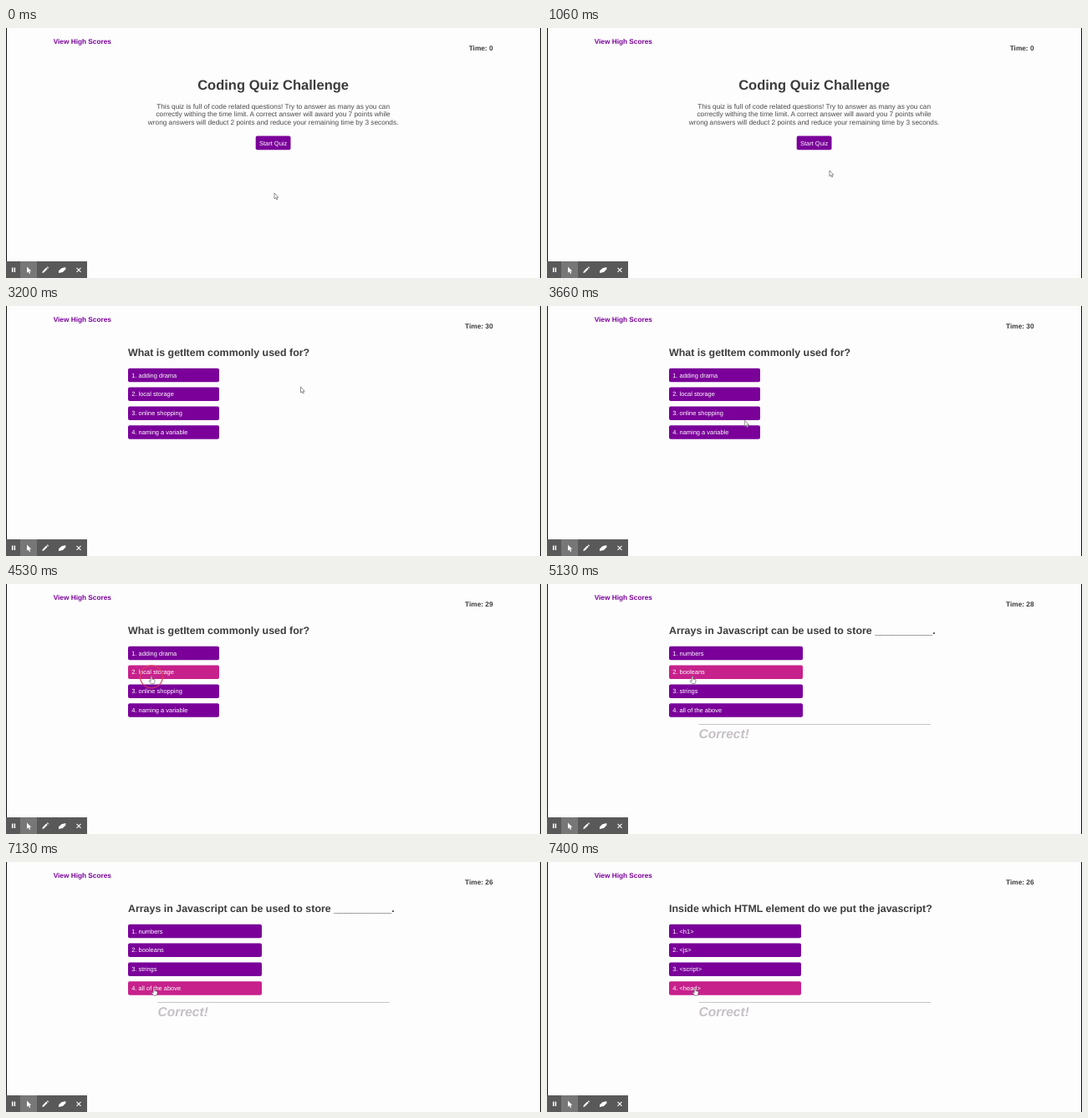
Write an HTML page that moves like this. It is 640 px wide and 300 px high and loops after 8000 ms.

```html
<!DOCTYPE html>
<html lang="en">
<head>
<meta charset="utf-8">
<title>Coding Quiz</title>
<style>
  html, body { margin: 0; width: 100%; height: 100%; overflow: hidden; background: #fdfdfd; }
  svg { display: block; width: 640px; height: 300px; }
  text { font-family: "Liberation Sans", Arial, sans-serif; font-size: 8.27px; fill: #4a4a4a; text-rendering: geometricPrecision; white-space: pre; }
  .bold { font-weight: bold; fill: #3c3c3c; }
  .mid { text-anchor: middle; }
  .btn rect { fill: #7a0099; }
  .btn.hover rect { fill: #c7218c; }
  .btn text { font-size: 7.47px; fill: #fff; }
</style>
</head>
<body>
<svg viewBox="0 0 640 300">
  <rect width="640" height="300" fill="#fdfdfd"/>
  <rect width="1" height="300" fill="#111"/>
  <rect x="639" width="1" height="300" fill="#111"/>
  <text class="bold" x="56.7" y="18.6" style="fill:#7a0099">View High Scores</text>
  <text class="bold" id="timer" x="582.5" y="26.9" text-anchor="end"></text>

  <g id="intro">
    <text class="bold mid" x="319.6" y="74.2" style="font-size:16.54px">Coding Quiz Challenge</text>
    <text class="mid" x="319.6" y="97">This quiz is full of code related questions! Try to answer as many as you can</text>
    <text class="mid" x="319.6" y="106.2">correctly withing the time limit. A correct answer will award you 7 points while</text>
    <text class="mid" x="319.6" y="115.5">wrong answers will deduct 2 points and reduce your remaining time by 3 seconds.</text>
    <g class="btn" id="start">
      <rect x="298.7" y="129.6" width="41.8" height="16.6" rx="2"/>
      <text class="mid" x="319.6" y="140.5">Start Quiz</text>
    </g>
    <rect id="focus" x="298.5" y="129.5" width="42" height="16.8" rx="1.5" fill="none" stroke="#1a1016"/>
  </g>

  <g id="quiz">
    <text class="bold" id="ask" x="146" y="59.6" style="font-size:12.42px"></text>
    <g id="options"></g>
    <g id="result">
      <path d="M181.5 168.5H459" stroke="#c9c6c9"/>
      <text class="bold" x="181.5" y="185.2" style="font-size:15.5px;font-style:italic;fill:#c6c0c6">Correct!</text>
    </g>
  </g>

  <g>
    <rect y="280" width="97" height="20" fill="#595959"/>
    <rect x="17" y="280" width="20" height="20" fill="#777"/>
    <path d="M7.7 287.5v5.4M10.4 287.5v5.4" stroke="#fff" stroke-width="1.5"/>
    <path d="M25 286.4v7.3l1.8-1.5 1.2 2.7 1.2-.6-1.2-2.5h2.3z" fill="#fff"/>
    <path d="M43.3 294l.5-2 4.4-4.4 1.5 1.5-4.4 4.4zM48.8 287l.9-.8 1.5 1.5-.8.9z" fill="#fff"/>
    <path d="M63 291.5l3.3-3.3 5-1.2v2.6l-3.4 3.4-4.9 1z" fill="#fff"/>
    <path d="M84.5 287.9l5 5M89.5 287.9l-5 5" stroke="#fff" stroke-width="1.1"/>
  </g>

  <circle id="ring" r="13.5" fill="none" stroke="#dc3f5e" stroke-width="1.3"/>
  <g id="pointer">
    <path id="arrow" d="M0 0v7l1.6-1.4 1.1 2.4 1.1-.5-1-2.3h2z" fill="#fff" stroke="#6c6c6c" stroke-width=".75"/>
    <path id="hand" d="M-.8 .6q.8-1 1.6 0v3l2.6.6q.8.3.7 1.2l-.5 2.5-.6 1.3h-3.3l-2.6-3.3q.2-.9 1.1-.4l1 .8z" fill="#fff" stroke="#55485a" stroke-width=".6"/>
  </g>
</svg>
<script>
const LOOP = 8000, STEP = 200 / 3;
const $ = id => document.getElementById(id);

const questions = [
  { at: 2200, width: 109, ask: "What is getItem commonly used for?",
    options: ["adding drama", "local storage", "online shopping", "naming a variable"] },
  { at: 4660, width: 160, ask: "Arrays in Javascript can be used to store __________.",
    options: ["numbers", "booleans", "strings", "all of the above"] },
  { at: 7330, width: 158, ask: "Inside which HTML element do we put the javascript?",
    options: ["<h1>", "<js>", "<script>", "<head>"] }
];

// time, x, y of the pointer tip
const path = [
  [0, 321, 198], [660, 351, 189], [800, 351, 189], [1066, 338, 171],
  [1600, 320, 140], [2866, 320, 140], [3200, 352.5, 97], [3766, 212, 146],
  [4266, 174, 110.5], [5866, 174, 110.5], [6000, 174.5, 117.5],
  [6266, 177, 151], [LOOP, 177, 151]
];

// start, fade, end
const clicks = [[2130, 2200, 2260], [4530, 4660, 4730], [7200, 7260, 7330]];
const ticks = [3130, 4130, 5130, 6130, 7130];

const NS = "http://www.w3.org/2000/svg";
const rows = [0, 1, 2, 3].map(i => {
  const add = (parent, tag, attrs) => {
    const el = document.createElementNS(NS, tag);
    for (const key in attrs) el.setAttribute(key, attrs[key]);
    return parent.appendChild(el);
  };
  const y = 74.7 + i * 22.87;
  const g = add($("options"), "g", { class: "btn" });
  return {
    g, y,
    box: add(g, "rect", { x: 146, y, width: 109, height: 16.5, rx: 2 }),
    label: add(g, "text", { x: 150.2, y: y + 10.9 })
  };
});

function pointerAt(t) {
  const i = path.findIndex(p => p[0] > t);
  const a = path[i - 1], b = path[i];
  const k = (t - a[0]) / (b[0] - a[0]);
  return [a[1] + (b[1] - a[1]) * k, a[2] + (b[2] - a[2]) * k];
}

const inside = (x, y, left, top, w) => x >= left && x <= left + w && y >= top && y <= top + 16.6;
const show = (el, on) => { el.style.display = on ? "" : "none"; };

function draw(t) {
  const [x, y] = pointerAt(Math.floor((t + 7) / STEP) * STEP % LOOP);
  const question = questions.filter(q => t >= q.at).pop();
  let over = false;

  show($("intro"), !question);
  show($("quiz"), question);
  if (question) {
    $("ask").textContent = question.ask;
    show($("result"), question !== questions[0]);
    rows.forEach((row, i) => {
      const hit = inside(x, y, 146, row.y, question.width);
      row.box.setAttribute("width", question.width);
      row.label.textContent = `${i + 1}. ${question.options[i]}`;
      row.g.classList.toggle("hover", hit);
      over = over || hit;
    });
  } else {
    over = inside(x, y, 298.7, 129.6, 41.8);
    $("start").classList.toggle("hover", over);
    show($("focus"), t >= clicks[0][0]);
  }

  const passed = ticks.filter(at => t >= at).length;
  $("timer").textContent = "Time: " + (passed ? 31 - passed : 0);

  const click = clicks.find(c => t >= c[0] && t < c[2]);
  show($("ring"), click);
  if (click) {
    $("ring").setAttribute("transform", `translate(${x} ${y + 0.8})`);
    $("ring").setAttribute("opacity", t < click[1] ? 0.9 : 0.45);
  }
  $("pointer").setAttribute("transform", `translate(${x} ${y})`);
  show($("hand"), over);
  show($("arrow"), !over);
}

const begin = performance.now();
function frame() {
  draw((performance.now() - begin) % LOOP);
  requestAnimationFrame(frame);
}
frame();
</script>
</body>
</html>
```
